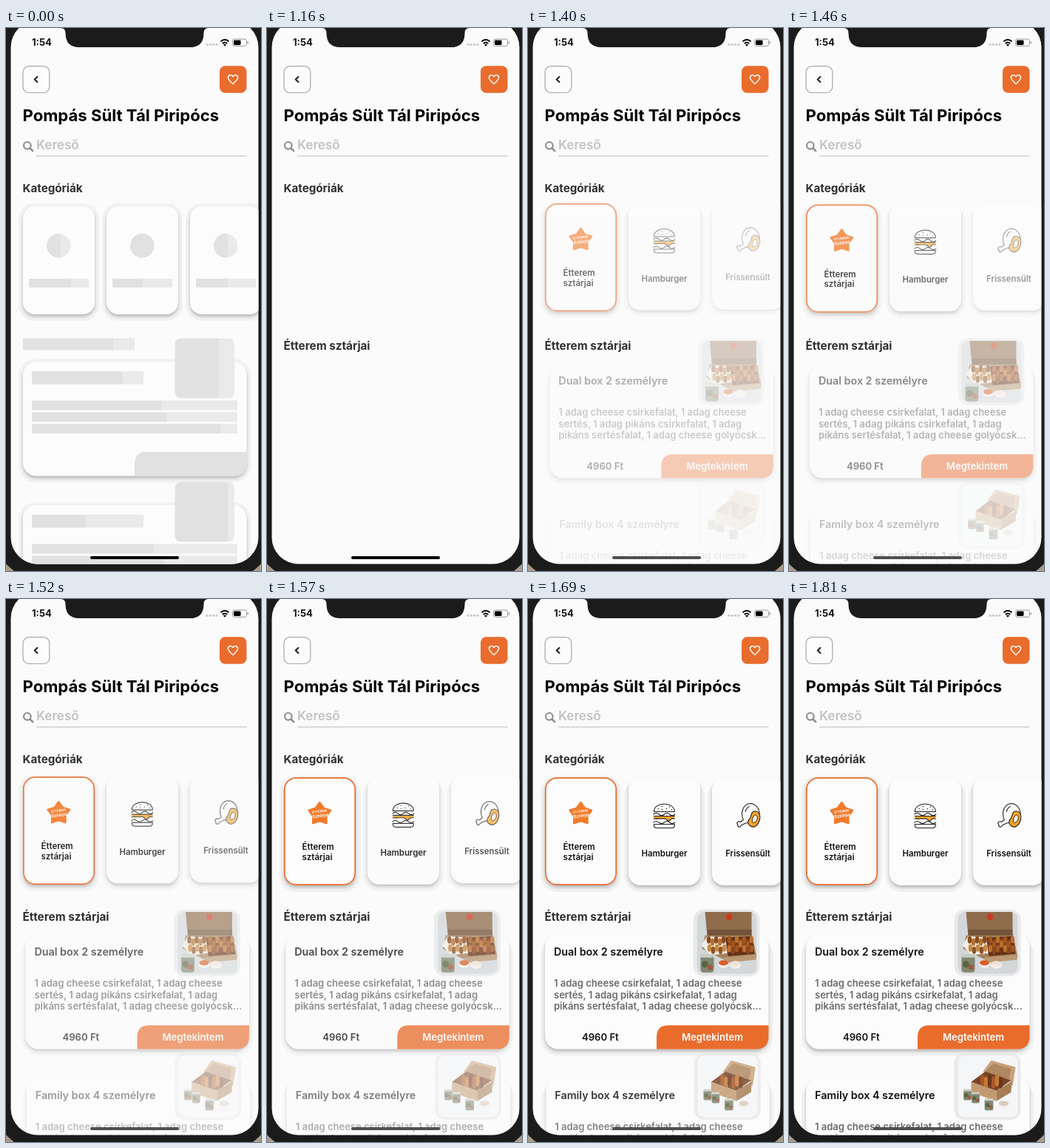
An HTML page for the animation above (3860 ms loop, 345 by 734 pixels).

```html
<!DOCTYPE html>
<html lang="hu">
<head>
<meta charset="utf-8">
<title>Étterem</title>
<style>
  html, body { margin: 0; width: 100%; height: 100%; overflow: hidden; background: #a99c8c; }
  svg { display: block; width: 345px; height: 734px; font-family: Inter, "Open Sans", sans-serif; }
  text { font-weight: 600; white-space: pre; }
  .bold { font-weight: 700; }
  .card { fill: #fcfcfc; filter: drop-shadow(0 3px 2px rgba(0, 0, 0, .24)); }
  .halo { fill: #000; opacity: .035; }
  .line { fill: none; stroke: #222; stroke-width: 1.1; stroke-linecap: round; stroke-linejoin: round; }
</style>
</head>
<body>
<svg viewBox="0 0 345 734">
  <defs>
    <clipPath id="screen"><rect x="6.5" y="-10" width="335" height="734.5" rx="36"/></clipPath>
    <clipPath id="photo"><rect width="81" height="84" rx="10"/></clipPath>
  </defs>
  <rect x="-13" y="-60" width="371" height="804" rx="56" fill="#1b1b1b"/>
  <g clip-path="url(#screen)">
    <rect width="345" height="734" fill="#fbfbfb"/>
    <g id="skeleton"></g>
    <g id="content"></g>
    <rect id="home" x="114" y="714" width="120" height="4" rx="2"/>
    <g id="header"></g>
  </g>
  <path d="M74 0Q80.5 0 80.5 7Q80.5 26 99 26H249Q267.5 26 267.5 7Q267.5 0 274 0Z" fill="#1b1b1b"/>
</svg>
<script>
const $ = id => document.getElementById(id);
const ORANGE = '#e96c2d';

const text = (x, y, size, str, fill = '#111', extra = '') =>
  `<text x="${x}" y="${y}" font-size="${size}" fill="${fill}" ${extra}>${str}</text>`;
const rect = (x, y, w, h, r, fill, extra = '') =>
  `<rect x="${x}" y="${y}" width="${w}" height="${h}" rx="${r}" fill="${fill}" ${extra}/>`;
const circle = (x, y, r, fill) => `<circle cx="${x}" cy="${y}" r="${r}" fill="${fill}"/>`;
const ellipse = (x, y, rx, ry, fill) => `<ellipse cx="${x}" cy="${y}" rx="${rx}" ry="${ry}" fill="${fill}"/>`;
const path = (d, fill, extra = '') => `<path d="${d}" fill="${fill}" ${extra}/>`;
const line = (d, style = '') => `<path d="${d}" class="line" style="${style}"/>`;
const place = (x, y, body) => `<g transform="translate(${x} ${y})">${body}</g>`;

// `haloTop` is where the soft outer shadow begins, relative to the card
function card(x, y, w, h, r, haloTop = -4) {
  return `<rect class="halo" x="${x - 6}" y="${y + haloTop}" width="${w + 12}" height="${h + 9 - haloTop}" rx="${r + 5}"/>
    <rect class="card" x="${x}" y="${y}" width="${w}" height="${h}" rx="${r}"/>`;
}

// Header

const header = () =>
  text(35, 24.2, 13, '1:54', '#111', 'class="bold"') +
  [272, 276.3, 280.6, 284.9].map(x => circle(x, 22.3, 1.6, '#c9c9c9')).join('') +
  line('M290.5 18.2Q296 13.4 301.5 18.2M292.8 20.9Q296 18.2 299.2 20.9', 'stroke:#000;stroke-width:2;stroke-linecap:butt') +
  path('M293.9 22.6Q296 20.9 298.1 22.6L296 24.8Z', '#000') +
  rect(306.5, 15, 19, 9.4, 2.6, 'none', 'stroke="#999"') +
  rect(308, 16.5, 9.6, 6.4, 1.4, '#000') + rect(326.6, 18, 1.3, 3.4, .6, '#999') +
  rect(23, 51.7, 35.8, 35.8, 8, '#fcfcfc', 'stroke="#a8a8a8" stroke-width="1.2"') +
  line('M42.4 66L38.7 69.5L42.4 73', 'stroke-width:2.1') +
  rect(289, 51.2, 36.5, 36.5, 7.5, ORANGE) +
  line('M307 75.5C303 72 300.4 69.9 300.4 67.1C300.4 63.4 305 62.3 307 65.6C309 62.3 313.6 63.4 313.6 67.1C313.6 69.9 311 72 307 75.5Z', 'stroke:#fff;stroke-width:1.4') +
  text(22.5, 126, 22.1, 'Pompás Sült Tál Piripócs', '#000', 'class="bold"') +
  line('M33 163L36.2 166.2', 'stroke:#8f8f8f;stroke-width:2.6') +
  rect(24, 154, 9.6, 9.6, 4.8, 'none', 'stroke="#8f8f8f" stroke-width="2.2"') +
  text(41, 164.4, 17.1, 'Kereső', '#c2c2c2') +
  rect(41, 172.4, 284.5, 1.2, 0, '#c6c6c6') +
  text(22.5, 221.7, 15.2, 'Kategóriák', '#303030', 'class="bold"');

// Loading placeholders: each bar has a lighter part right of `split`

let barCount = 0;
function bar(x, y, w, h, split, r = 0) {
  const id = 'bar' + barCount++;
  return `<linearGradient id="${id}" gradientUnits="userSpaceOnUse" x1="${split - 1}" x2="${split + 1}" y1="0" y2="0">
    <stop stop-color="#e1e1e1"/><stop offset="1" stop-color="#eaeaea"/></linearGradient>` +
    rect(x, y, w, h, r, `url(#${id})`);
}

function foodSkeleton(dy, title, lines, square) {
  const rows = lines.map((split, i) => bar(35, 503.5 + 15.8 * i, 278, 13, split)).join('');
  return place(0, dy, card(23, 451, 302.5, 154.5, 18) +
    bar(35, 464, 151, 17.5, title) + rows +
    path('M174 605.5V589Q174 573 190 573H325.5V588Q325.5 605.5 308 605.5Z', '#e1e1e1') +
    bar(228.5, 419.5, 80.5, 81, square, 8));
}

const skeleton = () =>
  [[23, 74, 88], [136, 201, 185], [249, 300, 300]].map(([x, dot, label]) =>
    card(x, 241, 97, 146, 16) + bar(x + 32, 278, 32.5, 32.5, dot, 16.2) +
    bar(x + 8, 338.8, 81, 12, label)).join('') +
  bar(23, 419.5, 151, 16, 145) +
  foodSkeleton(0, 157, [210, 217, 290], 288) +
  foodSkeleton(194, 108, [200, 214, 290], 300);

// Category icons, drawn around their centre

function star() {
  const points = Array.from({ length: 10 }, (_, i) => {
    const a = (i * 36 - 90) * Math.PI / 180, r = i % 2 ? 9.5 : 15.5;
    return [r * Math.cos(a), r * Math.sin(a) + 1].map(v => v.toFixed(1)).join(' ');
  });
  return path(`M${points.join('L')}Z`, '#f37a2a', 'stroke="#f37a2a" stroke-width="2.5" stroke-linejoin="round"') +
    '<g text-anchor="middle" transform="rotate(-8)">' +
    text(0, -1, 4.2, 'ÉTTEREM', '#fff', 'class="bold"') +
    text(0, 5.5, 6, 'Sztárja', '#fff', 'font-style="italic" class="bold"') + '</g>';
}

const burger = () =>
  line('M-14 -6C-14 -20 14 -20 14 -6Z') +
  line('M-8 -10h.1M-3 -13h.1M3 -10h.1M7 -12.5h.1M-3 -9h.1M10 -8.5h.1', 'stroke-width:1.3') +
  line('M-14.5 -2.5Q-11 -6 -7.2 -2.5T0 -2.5T7.2 -2.5T14.5 -2.5') +
  path('M-14 0H14V3H10L6 7L1 3H-7L-10 5L-14 3Z', '#f7a32b') +
  line('M-14 0H14M-14 3.4H1L6 7L10 3.4H14') +
  line('M-14.5 8.5Q-11 5.5 -7.2 8.5T0 8.5T7.2 8.5T14.5 8.5') +
  line('M-14 11H14V12Q14 16 10 16H-10Q-14 16 -14 12Z');

const drumstick = () =>
  line('M-6 5C-10 -4 -7 -16 3 -17C12 -17 16 -9 16 -1M-6 5L-10 8C-13 6 -16 9 -13.5 11.5C-14 15 -9.5 16 -9 12.5L-3 9.5L1 9') +
  line('M-3 -6Q-2 -11 2 -13') +
  path('M7 -6C14 -9 18 -2 16 5C14 13 8 17 3 13C-1 10 0 6 3 3C5 1 4 -4 7 -6Z', '#f7a32b', 'stroke="#222" stroke-width="1.1"') +
  path('M9 -1C13 -3 14 2 12 6C10 9 6 10 6 7C6 4 7 1 9 -1Z', '#fff3dd', 'stroke="#222"');

// Flat food pictures on an 81 x 84 area

const jar = (x, y, s) => place(x, y, `<g transform="scale(${s})">` +
  rect(-9, -10, 18, 23, 4, '#7f8771') + rect(-9, -12, 18, 5, 2, '#c9cdc6') +
  circle(-3, 2, 4.5, '#5b653f') + circle(4, 6, 3.5, '#a3543c') + '</g>');
const cup = (x, y, fill) => ellipse(x, y + 2, 7.5, 5, '#f3efec') + ellipse(x, y, 6.5, 3.6, fill);

// Overlapping bites in rows of `cols`
const pieces = (x, y, cols, n, fills) => Array.from({ length: n }, (_, i) =>
  ellipse(x + i % cols * 5, y + Math.floor(i / cols) * 6 + i % 2 * 3, 2.8, 5, fills[i % fills.length])).join('');

const dualBox = () =>
  rect(0, 0, 81, 84, 0, '#d3d7da') +
  path('M11 0H74V33H14Z', '#8f6c4c') + path('M14 24H74V33H14Z', '#74543a') +
  circle(43.5, 7, 4.5, '#c83d22') +
  path('M11 32H75L81 62L35 64L7 50Z', '#a5815c') +
  path('M6 45L14 33L38 35L41 56L18 59Z', '#f1ede6') +
  pieces(16, 38, 5, 5, ['#8a4a20', '#b5722f']) + pieces(17, 49, 5, 5, ['#c58a45', '#8f5425']) +
  path('M39 35L74 33L78 57L42 60Z', '#5f3018') +
  pieces(44, 38, 7, 21, ['#a4561f', '#6f3517', '#bb6f2e', '#8a4520']) +
  path('M36 62L80 58V65L37 69Z', '#b99873') +
  cup(52, 70, '#f0e3d6') + cup(36, 69, '#d8602b') + jar(14, 69, 1);

const familyBox = () =>
  rect(0, 0, 81, 84, 0, '#f4f6f8') +
  path('M34 22L45 7L78 16L74 42L70 34Z', '#c8a27a') +
  path('M37 22L48 11L72 18L69 34Z', '#b08760') +
  path('M18 36L37 22L72 34L52 48Z', '#7a4526') +
  pieces(33, 31, 6, 12, ['#a85726', '#c47a37', '#6d3619']) +
  path('M18 36L52 48V62L18 50Z', '#c39a70') + path('M52 48L73 35L72 50L52 62Z', '#a67d55') +
  jar(13, 53, .6) + jar(24, 57, .6) + jar(42, 66, .65) + cup(62, 65, '#d9cbbd');

// Content

function category(x, icon, labels, active) {
  return card(x, 241, 97, 146, 16, active ? -2 : 4) +
    (active ? rect(x + .8, 241.8, 95.4, 144.4, 15.5, '#fcfcfc', `stroke="${ORANGE}" stroke-width="1.7"`) : '') +
    place(x + 48.3, active ? 289.5 : 293.5, icon) +
    labels.map((s, i) => active
      ? text(x + 24.5, 339 + 13.6 * i, 11.5, s)
      : text(x + 48.5, 348, 11.4, s, '#111', 'text-anchor="middle"')).join('');
}

const DESCRIPTION = [
  '1 adag cheese csirkefalat, 1 adag cheese',
  'sertés, 1 adag pikáns csirkefalat, 1 adag',
  'pikáns sertésfalat, 1 adag cheese golyócsk...'
];

const food = (dy, title, picture) => place(0, dy,
  card(23, 453, 302.5, 155.5, 18, 6) +
  path('M174 608.5V592Q174 576.3 190 576.3H325.5V591Q325.5 608.5 308 608.5Z', ORANGE) +
  text(35, 481.5, 14.3, title) +
  DESCRIPTION.map((s, i) => text(35, 524 + 15.5 * i, 13, s, '#6a6a6a')).join('') +
  text(73, 597.3, 13.1, '4960 Ft') +
  text(249.5, 597.3, 13.1, 'Megtekintem', '#fff', 'text-anchor="middle"') +
  rect(223.5, 419.5, 90, 90.5, 14, '#e9e9e9') +
  place(228.5, 422.8, `<g clip-path="url(#photo)">${picture}</g>`));

const items = [
  { start: 1160, dy: -10, body: category(23, star(), ['Étterem', 'sztárjai'], true) },
  { start: 1220, dy: -10, body: category(136, burger(), ['Hamburger']) },
  { start: 1295, dy: -9, body: category(249, drumstick(), ['Frissensült']) },
  { start: 1270, dx: 9.5, body: food(0, 'Dual box 2 személyre', dualBox()) },
  { start: 1360, dx: 8, body: food(194, 'Family box 4 személyre', familyBox()) }
];

$('header').innerHTML = header();
$('skeleton').innerHTML = skeleton();
$('content').innerHTML = items.map(item => `<g>${item.body}</g>`).join('') +
  text(22.5, 435, 15.25, 'Étterem sztárjai', '#303030', 'class="bold"');
items.forEach((item, i) => item.node = $('content').children[i]);

// Timeline

const LOOP = 3860, LOADED = 1160, FADE = 395;
const STEPS = [0, 1160, 1220, 1280, 1340, 1400, 1460, 1520, 1570, 1630, 1690, 1750, 1810];

function render(time) {
  const t = STEPS.findLast(step => step <= time);
  const loaded = t >= LOADED;
  $('skeleton').style.display = loaded ? 'none' : '';
  $('content').style.display = loaded ? '' : 'none';
  $('home').setAttribute('fill', t < 1280 ? '#000' : '#505050');
  for (const { start, dx = 0, dy = 0, node } of items) {
    const p = Math.min(1, Math.max(0, (t - start) / FADE));
    node.setAttribute('opacity', p);
    node.setAttribute('transform', `translate(${dx * (1 - p)} ${dy * (1 - p)})`);
  }
}

const began = performance.now();
function tick() {
  render((performance.now() - began) % LOOP);
  requestAnimationFrame(tick);
}
tick();
</script>
</body>
</html>
```
